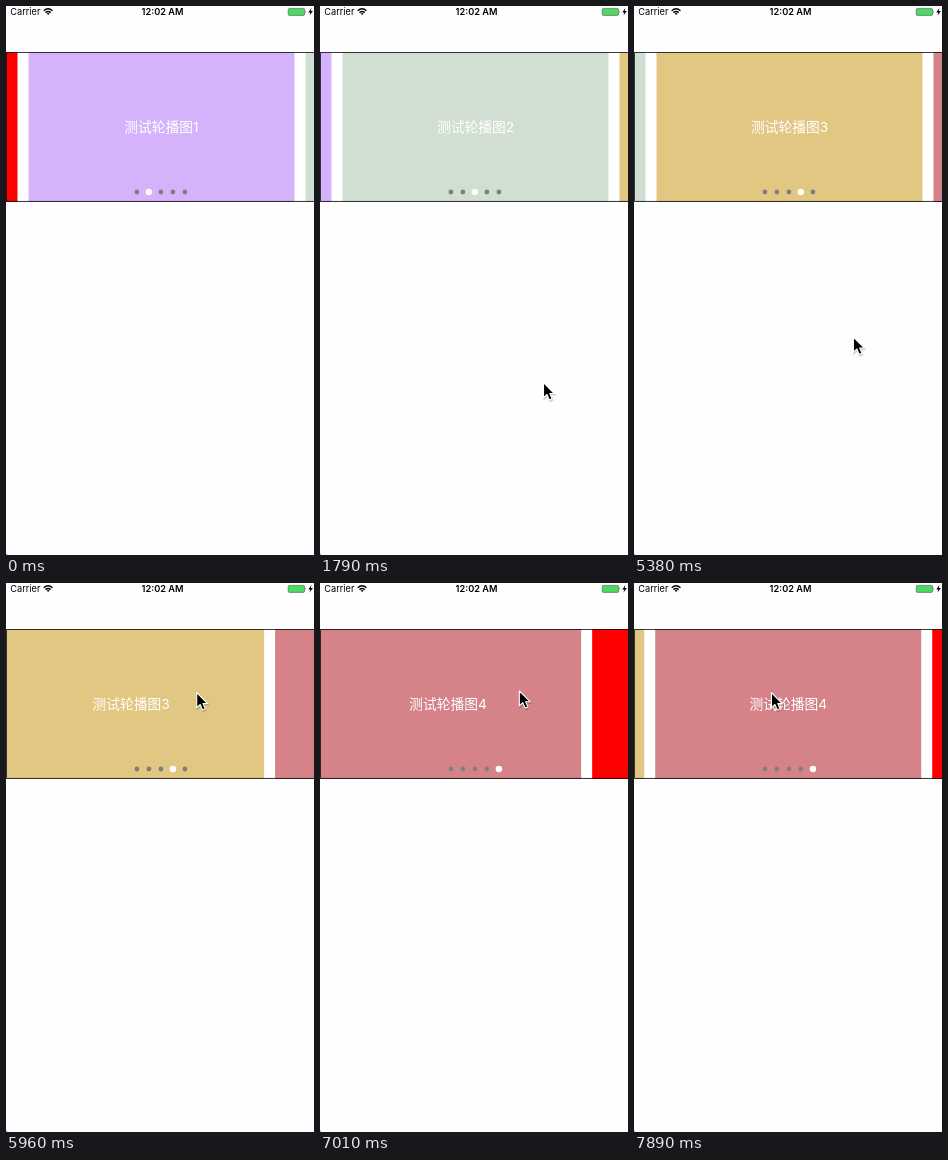
Recreate the animation shown at these times as an HTML page. Size 308 by 549 pixels, loop 8 s.

```html
<!DOCTYPE html>
<html lang="zh">
<head>
<meta charset="utf-8">
<style>
  html, body { margin: 0; width: 100%; height: 100%; overflow: hidden; background: #fefefe; }
  svg { display: block; width: 100vw; height: 100vh; }
  text { font-family: Inter, "Noto Sans CJK SC", "Noto Sans CJK", sans-serif; }
  .status { font-size: 9.2px; }
  .label { font-size: 13.75px; fill: #fff; text-anchor: middle; }
</style>
</head>
<body>
<svg viewBox="0 0 308 549">
  <defs>
    <clipPath id="window"><rect y="46" width="308" height="150"/></clipPath>
    <path id="arrow" d="M0 0V15L3.5 11.8L5.8 17.2L8.6 16L6.3 10.8H10.8Z"/>
  </defs>

  <g class="status">
    <text x="4.3" y="9.2">Carrier</text>
    <g fill="none" stroke="#000" stroke-width="1.4">
      <path d="M37.7 4.7Q42.1 .8 46.5 4.7M39.5 6.6Q42.1 4.4 44.7 6.6"/>
      <path d="M40.6 7.5Q42.1 6.4 43.6 7.5L42.1 9.1Z" fill="#000" stroke="none"/>
    </g>
    <text x="156.5" y="9.2" font-weight="600" text-anchor="middle">12:02 AM</text>
    <rect x="282.2" y="2.4" width="16.4" height="7" rx="1.2" fill="#4cd964" stroke="#555" stroke-width=".6"/>
    <path d="M299.4 4.6Q300.6 5.9 299.4 7.2Z" fill="#555"/>
    <path d="M305.4 2L302.3 6.4H304.3L303.5 9.6L306.9 5.1H304.8Z"/>
  </g>

  <g clip-path="url(#window)">
    <rect y="46" width="308" height="150" fill="#fff"/>
    <g id="strip"></g>
    <g id="dots"></g>
    <path d="M309 46.45H.41V195.45H309" fill="none" stroke="#000" stroke-width=".82"/>
  </g>
  <path d="M0 547L1.5 549H0Z" fill="#aaa"/>

  <g id="pointer">
    <use href="#arrow" x=".6" y="1.4" opacity=".18" stroke="#000" stroke-width="1.4"/>
    <use href="#arrow" stroke="#fff" stroke-width="1.1" stroke-linejoin="round"/>
  </g>
</svg>
<script>
const LOOP = 8000, TICK = 148.8; // the picture is held for one tick
const PITCH = 277, CARD_X = 22.5, CARD_W = 266;
const COLORS = ['#ff0000', '#d5b3fb', '#d1dfd2', '#e2c783', '#d58388'];

// Each move eases its page and pointer offsets in; start and length are in ticks.
const AUTO_SLIDE = { length: 1.79, page: 1 };
const START = { page: 1, x: 117, y: 409 };
const MOVES = [
  { start: 2, length: 2, x: 127, y: 137 },      // pointer leaves at the bottom
  { start: 6, length: 5, x: -21, y: -169 },     // and comes back unseen
  { start: 8.2, ...AUTO_SLIDE },
  { start: 28.2, ...AUTO_SLIDE },
  { start: 34.95, length: 4, x: -24, y: -267 }, // reach for the carousel
  { start: 39.3, length: 3.4, page: 1, x: -80 },
  { start: 42.7, length: 2.3, x: 88, y: -2 },
  { start: 46.3, length: 3.6, page: 1, x: -83, y: 2 },
  { start: 50.6, length: 2.5, page: -1, x: 13 }
];

const $ = id => document.getElementById(id);
function add(parent, tag, attrs, text = '') {
  const node = document.createElementNS('http://www.w3.org/2000/svg', tag);
  for (const name in attrs) node.setAttribute(name, attrs[name]);
  node.textContent = text;
  return parent.appendChild(node);
}

for (let i = 0; i < 7; i++) {
  const x = CARD_X + i * PITCH;
  add($('strip'), 'rect', { x, y: 46, width: CARD_W, height: 150, fill: COLORS[i % 5] });
  add($('strip'), 'text', { x: x + CARD_W / 2, y: 126, class: 'label' }, '测试轮播图' + i % 5);
}
const dots = COLORS.map((_, i) => add($('dots'), 'circle', { cx: 130.9 + i * 12, cy: 186 }));

function ease(k) {
  k = Math.min(1, Math.max(0, k));
  return k * k * (3 - 2 * k);
}

function valueAt(name, tick) {
  return MOVES.reduce((sum, move) =>
    sum + (move[name] || 0) * ease((tick - move.start) / move.length), START[name]);
}

function draw(now) {
  const tick = Math.floor(now % LOOP / TICK);
  const page = valueAt('page', tick);
  const pointerShown = tick >= 2 && tick < 6 || tick >= 11;
  $('strip').setAttribute('transform', `translate(${-page * PITCH} 0)`);
  $('pointer').setAttribute('transform',
    `translate(${valueAt('x', tick) + 0.5} ${valueAt('y', tick) - 0.3})`);
  $('pointer').setAttribute('visibility', pointerShown ? 'visible' : 'hidden');
  dots.forEach((dot, i) => {
    const active = i === Math.round(page) % 5;
    dot.setAttribute('r', active ? 3.2 : 2.4);
    dot.setAttribute('fill', active ? '#fff' : '#7f7f7f');
  });
}

const start = performance.now();
(function loop() {
  draw(performance.now() - start);
  requestAnimationFrame(loop);
})();
</script>
</body>
</html>
```
